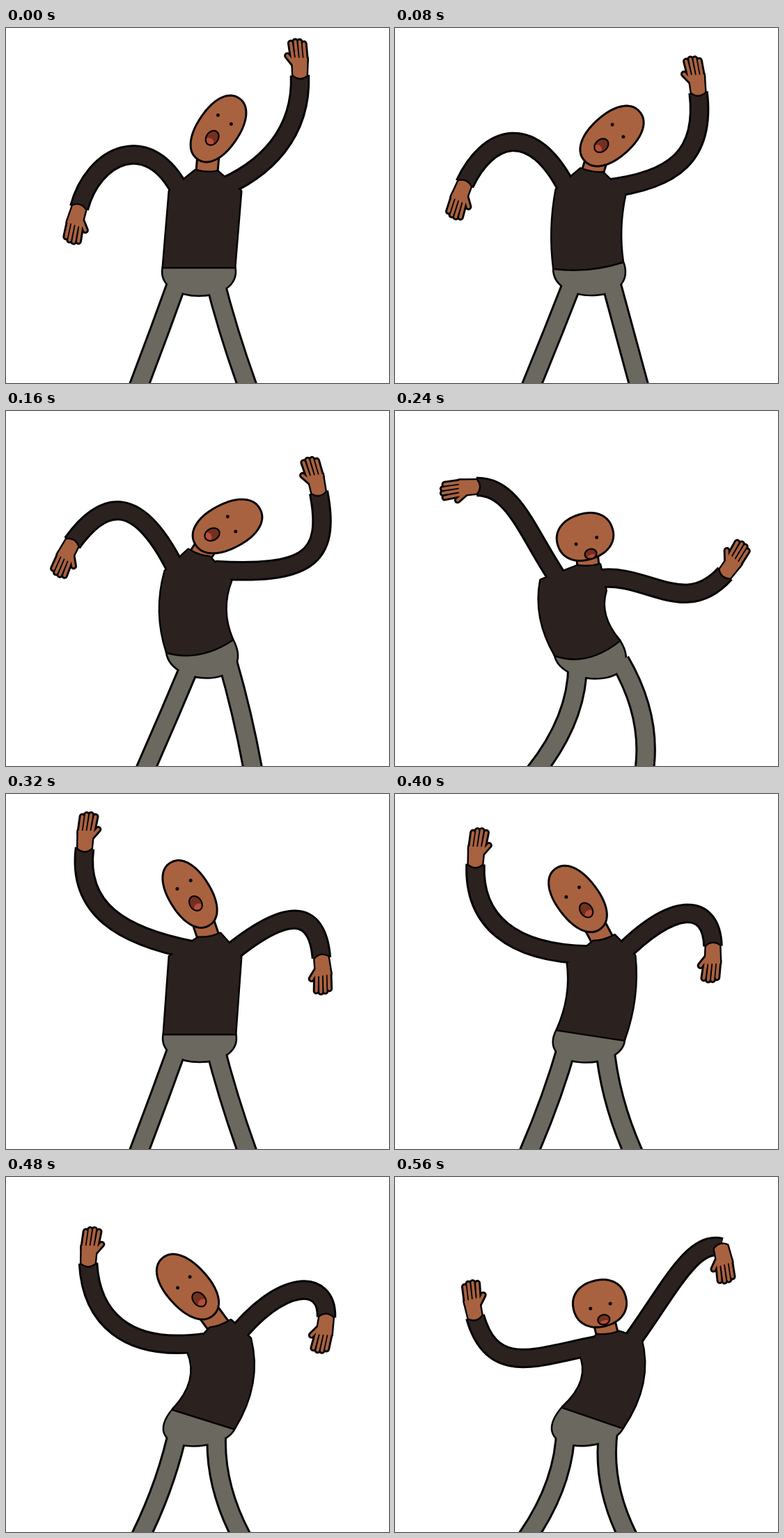
Animation of 550x511 px, one loop 640 ms. Source, as an HTML page with a canvas:

```html
<!DOCTYPE html>
<html lang="en">
<head>
<meta charset="utf-8">
<title>Dancer</title>
<style>
  html, body { margin: 0; width: 100%; height: 100%; overflow: hidden; background: #fff; }
  canvas { display: block; }
</style>
</head>
<body>
<canvas id="stage" width="550" height="511"></canvas>
<script>
const ctx = document.getElementById('stage').getContext('2d');
const INK = '#050303', KNIT = '#2b2220', SKIN = '#a9623f', CLOTH = '#6b6860';
const LINE = 3, STEP = 80, RAD = Math.PI / 180;

// A key pose of the rig:
//   armL, armR   Bezier from wrist to shoulder      hands  angle of each hand
//   collar, chest  centre points                    hip    centre and tilt
//   legs         x at hip, knee and foot, left then right
//   head         centre, half width, half length, angle, how far the face slides down
const key = fields => Object.fromEntries(Object.entries(fields)
  .map(([name, text]) => [name, text.match(/-?[\d.]+/g).map(Number)]));

const STANCE = '248 217 185  299 323 352';

const upRight = key({
  armL: '105,259 125,183 205,143 252,238', armR: '422,68 425,150 375,205 300,234', hands: '200 3',
  collar: '288,206', chest: '286,235', hip: '277,344 0', legs: STANCE, head: '305,145 30 53 34 0'
});
const leanRight = key({
  armL: '95,190 138,130 190,110 250,240', armR: '449,117 468,215 430,236 300,229', hands: '212 -8',
  collar: '277,205', chest: '276,237', hip: '278,338 -11',
  legs: '267 231 194  318 340 357', head: '318,166 32 53 62 9'
});
const swingLeft = key({
  armL: '117,109 172,108 190,178 240,250', armR: '474,234 415,300 360,230 290,242', hands: '270 40',
  collar: '278,222', chest: '256,251', hip: '276,341 -13',
  legs: '262 246 193  323 356 356', head: '273,181 41 33 -18 16'
});
const upLeft = key({
  armL: '113,78 102,165 165,205 270,225', armR: '453,236 447,165 405,160 315,235', hands: '0 170',
  collar: '292,204', chest: '286,234', hip: '278,345 0', legs: STANCE, head: '264,144 30 53 -32 0'
});
const leanLeft = key({
  armL: '118,124 122,200 170,254 285,238', armR: '460,202 462,145 395,145 325,235', hands: '0 184',
  collar: '308,212', chest: '306,242', hip: '284,348 17.5',
  legs: '248 224 187  303 310 345', head: '261,158 31 55 -42 8'
});
const swingRight = key({
  armL: '115,201 140,290 205,258 290,242', armR: '468,101 425,90 390,170 330,250', hands: '-15 163',
  collar: '306,225', chest: '309,243', hip: '284,346 19',
  legs: '245 229 182  307 309 341', head: '294,182 38.5 33.5 -14 14'
});

const halfway = (a, b) => Object.fromEntries(Object.keys(a)
  .map(name => [name, a[name].map((v, i) => (v + b[name][i]) / 2)]));
const DANCE = [upRight, halfway(upRight, leanRight), leanRight, swingLeft,
               upLeft, halfway(upLeft, leanLeft), leanLeft, swingRight];

function trace(draw) {
  const path = new Path2D();
  draw(path);
  return path;
}

function stroke(path, color, width, cap = 'butt') {
  ctx.lineCap = cap;
  ctx.strokeStyle = color;
  ctx.lineWidth = width;
  ctx.stroke(path);
}

function fill(path, color) {
  ctx.fillStyle = color;
  ctx.fill(path);
}

// A body and the limbs growing out of it, under one common outline.
function outlined(body, limbs, width, color, cap) {
  stroke(body, INK, LINE + 2);
  limbs.forEach(limb => stroke(limb, INK, width + LINE, cap));
  fill(body, color);
  limbs.forEach(limb => stroke(limb, color, width - LINE, cap));
}

const along = (x, y, angle, distance) =>
  [x + distance * Math.cos(angle * RAD), y + distance * Math.sin(angle * RAD)];

const arm = ([x, y, ...curve]) => trace(p => {
  p.moveTo(x, y);
  p.bezierCurveTo(...curve);
});

const leg = (hip, knee, foot) => trace(p => {
  p.moveTo(hip, 360);
  p.quadraticCurveTo(2 * knee - (hip + foot) / 2, 445, foot, 530);
});

// The trunk bows sideways and the chest counters the tilt of the hip.
function trunk({ collar, chest, hip: [hipX, hipY, tilt] }, neckAngle) {
  const half = 51 - .3 * Math.abs(tilt);
  const [neckL, neckR] = [-16, 16].map(d => along(...collar, neckAngle / 2, d));
  const [pitL, pitR] = [-half, half].map(d => along(...chest, -.7 * tilt, d));
  const [hemL, hemR] = [-half, half].map(d => along(hipX, hipY, tilt, d));
  const bow = (p, a, b) =>
    p.quadraticCurveTo((a[0] + b[0]) / 2 + 1.6 * tilt, (a[1] + b[1]) / 2, ...b);

  const sweater = trace(p => {
    p.moveTo(...neckL);
    p.quadraticCurveTo(collar[0], collar[1] + 4, ...neckR);
    p.lineTo(...pitR);
    bow(p, pitR, hemR);
    p.quadraticCurveTo(hipX, hipY + Math.max(0, -2 * tilt), ...hemL);
    bow(p, hemL, pitL);
    p.closePath();
  });
  const seatX = hipX - 2 * tilt;
  const seat = trace(p => {
    p.moveTo(...hemL);
    p.bezierCurveTo(seatX - 62, 398, seatX + 62, 398, ...hemR);
    p.closePath();
  });
  return { sweater, seat };
}

// Wrist at the origin, fingers up, thumb towards positive x.
const PALM = new Path2D('M-10 0L-9.5 -26L12.5 -26L10 0Q0 8 -10 0Z');
const DIGITS = trace(p => {
  for (let i = 0; i < 4; i++) {
    p.moveTo(6 * i - 7, -22);
    p.lineTo(6.5 * i - 3.5, -45 - 5 * Math.sin(Math.PI * (i + .5) / 4));
  }
  p.moveTo(5, -11);
  p.lineTo(20, -28);
});

function drawHand([x, y], angle, thumbSide) {
  ctx.save();
  ctx.translate(x, y);
  ctx.rotate(angle * RAD);
  ctx.scale(thumbSide * .97, .97);
  outlined(PALM, [DIGITS], 7.2, SKIN, 'round');
  ctx.restore();
}

const oval = (x, y, rx, ry, power = 2) => trace(p => {
  const bend = v => Math.sign(v) * Math.abs(v) ** (2 / power);
  for (let a = 0; a < 360; a += 4) {
    p.lineTo(x + rx * bend(Math.cos(a * RAD)), y + ry * bend(Math.sin(a * RAD)));
  }
  p.closePath();
});

function drawHead([x, y, width, length, angle, slide]) {
  const skull = oval(0, 0, width, length, 2.2);
  const lips = oval(0, .3 * length + slide, 8.5, .21 * length);
  ctx.save();
  ctx.translate(x, y);
  ctx.rotate(angle * RAD);
  fill(skull, SKIN);
  stroke(skull, INK, LINE);
  for (const side of [-1, 1]) fill(oval(side * .38 * width, slide - .3 * length, 2.5, 2.5), INK);
  fill(lips, '#74301f');
  ctx.save();
  ctx.clip(lips);
  fill(oval(0, .46 * length + slide, 7, .13 * length), '#b54d3b');
  ctx.restore();
  stroke(lips, INK, 2.2);
  ctx.restore();
}

function draw(pose, thumbSide) {
  const { armL, armR, hands, collar, legs, head } = pose;
  const [headX, headY, width, length, angle] = head;
  const [chinX, chinY] = along(headX, headY, angle + 90, Math.max(0, length - width));
  const neckAngle = Math.atan2(chinX - collar[0], collar[1] - chinY) / RAD;
  const neck = trace(p => {
    p.moveTo(collar[0], collar[1] + 6);
    p.lineTo(chinX, chinY);
  });
  const { sweater, seat } = trunk(pose, neckAngle);

  ctx.fillStyle = '#fff';
  ctx.fillRect(0, 0, 550, 511);
  ctx.lineJoin = 'round';
  outlined(seat, [leg(...legs.slice(0, 3)), leg(...legs.slice(3))], 26.5, CLOTH);
  outlined(new Path2D(), [neck], 31, SKIN);
  outlined(sweater, [arm(armL), arm(armR)], 25.5, KNIT);
  drawHand(armL, hands[0], thumbSide);
  drawHand(armR, hands[1], thumbSide);
  drawHead(head);
}

const start = performance.now();
function tick() {
  const beat = Math.floor((performance.now() - start) / STEP) % DANCE.length;
  draw(DANCE[beat], beat < 4 ? -1 : 1);
  requestAnimationFrame(tick);
}
tick();
</script>
</body>
</html>
```
